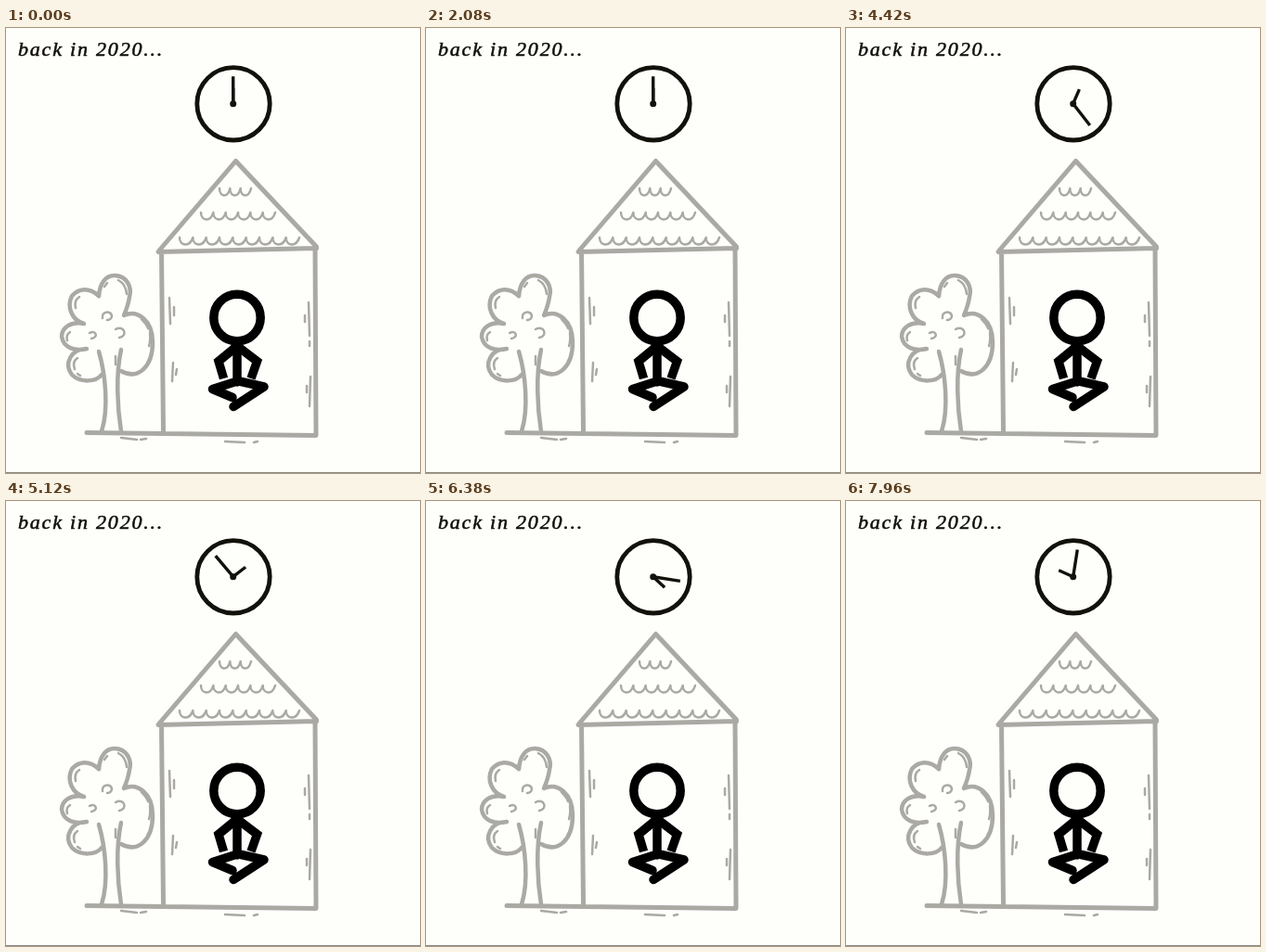
These frames come from a looping animation (446 by 480 pixels, 8000 ms). An HTML page:

```html
<!DOCTYPE html>
<html lang="en">
<head>
<meta charset="utf-8">
<title>Back in 2020</title>
<style>
  html, body { margin: 0; width: 100%; height: 100%; overflow: hidden; background: #fefefb; }
  svg { display: block; }
  path, line, circle { fill: none; }
  .house, .figure { stroke-linecap: round; stroke-linejoin: round; }
  .house { stroke: #aaa9a3; stroke-width: 5; }
  .thin { stroke-width: 2.5; }
  .figure { stroke: #000; stroke-width: 9.5; }
  .clock { stroke: #12110a; stroke-width: 3.4; }
  text { font: italic 22px "Liberation Serif", "Noto Serif", serif; letter-spacing: 1.8px;
         fill: #12110a; stroke: #12110a; stroke-width: .55px; }
</style>
</head>
<body>
<svg width="446" height="480" viewBox="0 0 446 480">
  <text x="13" y="29.5">back in 2020...</text>

  <g class="house">
    <path d="M165 240L247.500 143.500L334.500 236M164 241.500L334.500 237.500M167.500 241L169.500 436M333 238L334 439M87 436.500L334 439.500"/>
    <!-- tree crown and trunk -->
    <g stroke-width="4.500">
      <path d="M100 289C101 275 108 266 118 267C130 268 136 279 133 290C132 297 130 303 127 310
               C142 303 158 316 158 339C158 366 142 380 124 370"/>
      <path d="M100 289C89 279 78 281 71 289C65 301 71 315 84 319C70 316 60 323 60 333
               C62 345 74 349 87 346C70 346 62 362 71 374C80 383 97 382 103 374"/>
      <path d="M100 349C107 373 111 410 103 435M124 347C118 374 120 410 124 435"/>
    </g>
    <g class="thin">
      <path d="M104 313C103 306 112 304 114 310C114 313 112 315 109 315M90 329C97 325 100 334 92 335M118 325C127 320 132 332 122 334"/>
      <path d="M121 272Q129 276 130 287M75 302Q73 294 79 290M146 314Q152 320 153 324M155 329Q156 337 154 343
               M118 354L118 363M66 337Q64 331 69 328M74 368Q71 360 77 356M77 373L80 375M106 279L109 275"/>
      <!-- wall and ground marks -->
      <path d="M176 291L177 319M181 301V310M180 361L179 381M184 368L183 374
               M326 296L327 332M322 310V317M327 338V343M328 376L327 408M324 386V393
               M124 442L141 444M145 444L151 443M236 446L257 447M267 447L271 446"/>
      <path id="tiles"/>
    </g>
  </g>

  <g class="figure">
    <circle cx="249" cy="312.500" r="25.200"/>
    <path d="M249 343V382M249 381L222.500 389.500L244 398.500M249 380.500L278 387L245 408.500"/>
    <path d="M249 343L229 359.500L234.500 378M249 343L270.500 359.500L264 378" stroke-linecap="butt" stroke-linejoin="miter"/>
  </g>

  <g class="clock">
    <circle cx="245" cy="81.800" r="39.200" stroke-width="4.800"/>
    <g transform="translate(244.700 81.700)">
      <line id="minute" y2="-29.500"/>
      <line id="hour" y2="-17"/>
      <circle r="3.500" style="fill: #12110a; stroke: none"/>
    </g>
  </g>
  <path d="M0 479.500H446" stroke="#8a8a86"/>
</svg>
<script>
  const LOOP = 8000;
  const el = id => document.getElementById(id);

  function scallops(x, y, width, count) {
    const w = width / count;
    return `M${x} ${y}` + `c0 9 ${w * .75} 11 ${w} 0`.repeat(count);
  }
  el("tiles").setAttribute("d",
    scallops(230, 173, 34, 3) + scallops(210, 199, 80, 6) + scallops(187, 226, 129, 9));

  // Steps come in groups of three every 140 ms, held for 20, 20 and 100 ms.
  function stepAt(ms) {
    const group = Math.floor((ms - 80) / 140);
    const phase = ms - 80 - group * 140;
    return group * 3 + Math.min(2, Math.floor(phase / 20));
  }

  function draw(now) {
    const elapsed = Math.max(0, stepAt(now % LOOP) - 63);
    const angle = 0.158 * elapsed ** 2; // constant acceleration from rest
    el("minute").setAttribute("transform", `rotate(${angle})`);
    el("hour").setAttribute("transform", `rotate(${angle / 6.15})`);
    requestAnimationFrame(draw);
  }
  requestAnimationFrame(draw);
</script>
</body>
</html>
```
